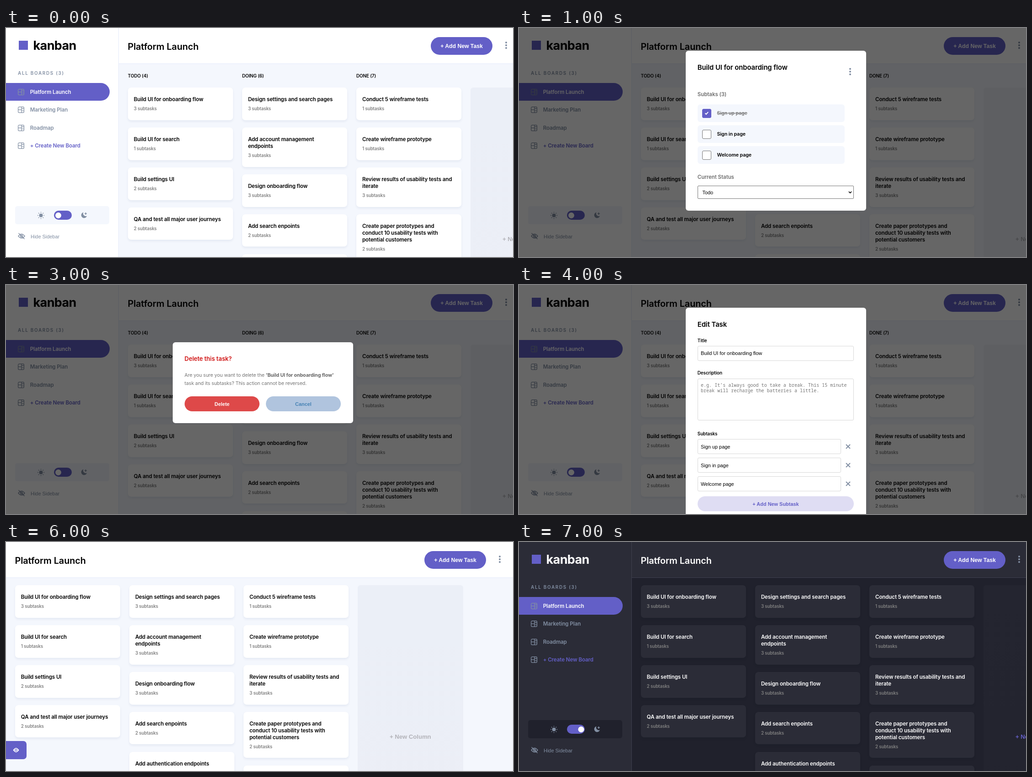
These frames come from a looping animation (1110 px wide and 504 px high, 8000 ms). An HTML page:

```html
<!DOCTYPE html>
<html lang="en">
<head>
<meta charset="utf-8">
<title>Kanban board</title>
<style>
html, body { margin: 0; width: 100%; height: 100%; overflow: hidden; }
.stage {
  --scroll: 0px; --side: 247px; --act: 0px; --knob: 0px; --menu: visible; --tab: hidden;
  --panel: #fff; --page: #f4f7fd; --ink: #000; --line: #e4ebfa;
  --colTop: #ebeff7; --colEnd: #eceef6; --new: #b2b2b8; --shadow: rgba(54, 78, 126, .08);
  position: relative; width: 1110px; height: 504px; overflow: hidden;
  background: var(--page); color: var(--ink); font: 600 11.5px Inter, sans-serif;
  animation: states 8s step-end infinite;
}
@keyframes states {
  62.5% { --scroll: -36px; }
  75% { --side: 0px; --act: -14px; --menu: hidden; --tab: visible; }
  87.5% {
    --side: 247px; --act: 0px; --menu: visible; --tab: hidden; --knob: 21.5px;
    --panel: #2b2c37; --page: #20212c; --ink: #fff; --line: #3e3f4e;
    --colTop: #242530; --colEnd: #22232e; --new: #635fc7; --shadow: rgba(20, 22, 35, .12);
  }
  100% { --scroll: -36px; }
}
.stage div, .stage svg { position: absolute; box-sizing: border-box; }
.text { line-height: 20px; margin-top: -10px; white-space: pre; letter-spacing: -.06px; }

.columns { left: var(--side); top: 0; transform: translateY(var(--scroll)); }
.stage .card {
  position: relative; width: 230px; margin-bottom: 16.4px; padding: 19.2px 13px 17.8px;
  border-radius: 7px; background: var(--panel); box-shadow: 0 3px 5px var(--shadow);
  line-height: 15px; letter-spacing: -.08px; white-space: pre;
}
.card small { display: block; margin-top: 4.6px; font-size: 9.8px; letter-spacing: -.15px; color: #808080; }
.label { font-size: 9.84px; }
.new-column { border-radius: 6px; background: linear-gradient(var(--colTop), var(--colEnd)); }
.new-text { font: 700 13.1px/20px "Liberation Sans", Arial, sans-serif; letter-spacing: 0; color: var(--new); }

.header { left: var(--side); top: 0; right: 0; height: 79px; background: var(--panel); border-bottom: 1px solid var(--line); }
.title { font-size: 19.8px; }
.actions { left: var(--act); top: 0; }
.button {
  display: flex; align-items: center; justify-content: center; border-radius: 20px;
  background: #635fc7; color: #fff; font: 700 10.93px "Liberation Sans", Arial, sans-serif;
}
.large { font-size: 12.2px; }

.sidebar { left: 0; top: 0; width: 247px; height: 504px; background: var(--panel); border-right: 1px solid var(--line); visibility: var(--menu); }
.logo { background: #635fc7; }
.brand { font-size: 27px; font-weight: 700; letter-spacing: -.6px; }
.caps { font-size: 9.84px; letter-spacing: 1.75px; color: #828fa3; }
.active { background: #635fc7; border-radius: 0 20px 20px 0; }
.white { color: #fff; }
.muted { color: #828fa3; }
.accent { color: #635fc7; }
.theme { background: var(--page); border-radius: 5px; }
.switch { background: #635fc7; border-radius: 10px; }
.knob { background: #fff; border-radius: 50%; transform: translateX(var(--knob)); }
.tab { background: #635fc7; border-radius: 0 7px 7px 0; visibility: var(--tab); }
.arial { font: 400 10.93px/20px "Liberation Sans", Arial, sans-serif; letter-spacing: 0; }

.scene { inset: 0; background: rgba(0, 0, 0, .6); color: #000; visibility: hidden; animation: show 8s step-end infinite; }
@keyframes show { 0% { visibility: visible; } 12.5% { visibility: hidden; } }
.modal { background: #fff; border-radius: 6px; }
.head { font-size: 14.8px; }
.grey { color: #6e6e6e; }
.row { background: #f4f7fd; border-radius: 6px; }
.small { font-size: 10.66px; letter-spacing: -.08px; }
.done { color: #757575; text-decoration: line-through; }
.check { border: 1px solid #767676; border-radius: 3px; background: #fff; }
.checked { background: #635fc7; border-color: #635fc7; }
.field { border: 1px solid #d8d8d8; border-radius: 3px; background: #fff; }
.native { border-color: #767676; border-radius: 2px; }
.mono { font: 400 10.05px/12px "Noto Sans Mono", monospace; letter-spacing: 0; margin-top: -6px; }
.hint { color: #757575; }
.red { color: #d01414; }
.question { font-size: 13.1px; }
.body { font-size: 10.66px; font-weight: 400; letter-spacing: -.1px; color: #757575; }
.body b { font-weight: 700; color: #666; }
.light { font-weight: 400; font-size: 10px; color: #999; }
.danger { background: #de4949; }
.cancel { background: #b0c4de; color: #4682b4; }
.soft { background: #dfddf3; color: #635fc7; }
.popup { background: #fff; border-radius: 6px; box-shadow: 0 4px 14px rgba(54, 78, 126, .25); }
</style>
</head>
<body>
<script>
const box = (cls, x, y, w, h, inner = '') =>
  `<div class="${cls}" style="left:${x}px;top:${y}px;width:${w}px;height:${h}px">${inner}</div>`;
// y is the middle of the capitals
const text = (cls, x, y, s) => `<div class="text ${cls}" style="left:${x}px;top:${y}px">${s}</div>`;
const icon = (x, y, w, h, inner) =>
  `<svg style="left:${x}px;top:${y}px" width="${w}" height="${h}" fill="none" stroke="#828fa3">${inner}</svg>`;
const dots = (x, y) => icon(x - 3, y - 9, 6, 18,
  [3, 9, 15].map(cy => `<circle cx="3" cy="${cy}" r="2" fill="#828fa3" stroke="none"/>`).join(''));
const chevron = (x, y) => icon(x - 4, y - 3, 8, 6, '<path d="M1 1l3 3 3-3" stroke="#000" stroke-width="1.7"/>');
const cross = (x, y) => icon(x, y, 11, 11, '<path d="M1 1l9 9M10 1l-9 9" stroke-width="2"/>');
const boardIcon = y => icon(26, y - 7, 14, 14,
  '<path d="M3 .6h8a2.4 2.4 0 0 1 2.4 2.4v8a2.4 2.4 0 0 1-2.4 2.4H3A2.4 2.4 0 0 1 .6 11V3A2.4 2.4 0 0 1 3 .6zM8 .6v12.8M.6 6.8H8M8 4.4h5.4M8 9h5.4" stroke-width="1.2"/>');

const lists = [
  ['TODO (4)', ['Build UI for onboarding flow', 3], ['Build UI for search', 1], ['Build settings UI', 2],
    ['QA and test all major user journeys', 2]],
  ['DOING (6)', ['Design settings and search pages', 3], ['Add account management\nendpoints', 3],
    ['Design onboarding flow', 3], ['Add search enpoints', 2], ['Add authentication endpoints', 3]],
  ['DONE (7)', ['Conduct 5 wireframe tests', 1], ['Create wireframe prototype', 1],
    ['Review results of usability tests and\niterate', 3],
    ['Create paper prototypes and\nconduct 10 usability tests with\npotential customers', 2], ['', 1]],
];

const columns = lists.map(([name, ...cards], i) => {
  const x = 19.8 + 250.1 * i;
  return text('label', x, 105, name) + box('', x, 131, 230, 0, cards.map(([title, n]) =>
    `<div class="card">${title}<small>${n} subtasks</small></div>`).join(''));
}).join('');

const board = `<div class="columns">${columns}${box('new-column', 770.2, 131, 230.5, 668)}
  ${text('new-text', 840, 465, '+ New Column')}</div>
  <div class="header">${text('title', 19.5, 40.5, 'Platform Launch')}</div>
  <div class="actions">${box('button large', 930, 20, 135, 39, '+ Add New Task')}${dots(1094.5, 38)}</div>`;

const sun = icon(68, 404, 17, 17, `<circle cx="8.5" cy="8.5" r="4" fill="#828fa3" stroke="none"/>
  <circle cx="8.5" cy="8.5" r="6.8" stroke-width="1.7" pathLength="80" stroke-dasharray="3 7" stroke-dashoffset="1.5"/>`);
const moon = icon(164, 405, 14, 14, `<path d="M5.5 .8A6.3 6.3 0 1 0 13 8.8A5.9 5.9 0 0 1 5.5 .8z" fill="#828fa3" stroke="none"/>
  <path d="M10.4 1v5M8 3.5h5" stroke-width="1.5"/>`);
const hiddenEye = icon(26, 450, 16, 16, `<path d="M1 8Q8 -1 15 8Q8 17 1 8zM1.5 1.5l13 13" stroke-width="1.4"/>
  <circle cx="8" cy="8" r="2.4" stroke-width="1.4"/>`);
const eye = icon(15, 15, 14, 10, `<path d="M.5 5Q7 -4.4 13.5 5Q7 14.4 .5 5z" fill="#fff" stroke="none"/>
  <circle cx="7" cy="5" r="2.9" fill="#635fc7" stroke="none"/><circle cx="7" cy="5" r="1.7" fill="#fff" stroke="none"/>`);

const nav = [['Platform Launch', 'white'], ['Marketing Plan', 'muted'], ['Roadmap', 'muted'],
  ['+ Create New Board', 'accent']].map(([name, cls], i) => {
  const y = 141 + 39.4 * i;
  return boardIcon(y) + text(cls, 52.7, y, name);
}).join('');

const sidebar = `<div class="sidebar">${box('logo', 28, 28, 20, 20)}
  ${text('brand', 59.5, 38.5, 'kanban')}${text('caps', 26, 99, 'ALL BOARDS (3)')}
  ${box('active', 0, 121, 227, 39)}${nav}${box('theme', 20, 392, 206, 40)}${sun}
  ${box('switch', 104.5, 402, 39.5, 20)}${box('knob', 107.5, 405.5, 13, 13)}${moon}
  ${hiddenEye}${text('arial muted', 54, 458.5, 'Hide Sidebar')}</div>${box('tab', 0, 438, 45, 40, eye)}`;

const modal = (y, h, inner) => box('modal', 364.5, y, 395, h, inner);
const scene = (second, inner) => `<div class="scene" style="animation-delay:${second}s">${inner}</div>`;
const subtasks = ['Sign up page', 'Sign in page', 'Welcome page'];
const taskName = lists[0][1][0];

const task = modal(50, 352, text('head', 26.3, 37, taskName) + dots(360, 46) +
  text('grey', 26.3, 95.5, 'Subtaks (3)') +
  subtasks.map((name, i) => {
    const y = 118 + 46 * i;
    return box('row', 26.5, y, 322, 39) + box(i ? 'check' : 'check checked', 36.5, y + 9.5, 20, 20) +
      text(i ? 'small' : 'small done', 69, y + 20, name);
  }).join('') +
  icon(41.5, 133, 10, 9, '<path d="M1.5 4.5l2.3 2.3 4.4-5" stroke="#fff" stroke-width="1.9"/>') +
  text('grey', 26.3, 277.5, 'Current Status') + box('field native', 26.5, 297, 342, 29) +
  text('arial', 37, 311.5, 'Todo') + chevron(360, 311.5));

const popup = box('popup', 576, 115, 157, 77,
  text('small muted', 13, 24, 'Edit Task') + text('small red', 13, 53, 'Delete Task'));

const confirm = modal(126, 178, text('red question', 26.3, 35.5, 'Delete this task?') +
  text('body', 26.3, 72.5, `Are you sure you want to delete the <b>'${taskName}'</b>`) +
  text('body', 26.3, 90.5, 'task and its subtasks? This action cannot be reversed.') +
  box('button danger', 26.5, 119, 164, 33, 'Delete') + box('button cancel', 204.5, 119, 164, 33, 'Cancel'));

const formTop = (heading, name, nameClass) => text('head', 26.3, 36.5, heading) +
  text('label', 26.3, 71.5, 'Title') + box('field', 26.5, 84, 342, 33) + text(`arial ${nameClass}`, 33.5, 100, name) +
  text('label', 26.3, 143, 'Description') + box('field', 26.5, 155.5, 342, 92) +
  text('mono hint', 33.5, 170, 'e.g. It’s always good to take a break. This 15 minute\nbreak will recharge the batteries a little.') +
  text('label', 26.3, 277, 'Subtasks');

const edit = modal(50, 560, formTop('Edit Task', taskName, '') +
  subtasks.map((name, i) => {
    const y = 289 + 41 * i;
    return box('field', 26.5, y, 314, 33) + text('arial', 33.5, y + 16.5, name) + cross(350, y + 11);
  }).join('') +
  box('button soft', 26.5, 415, 342, 33, '+ Add New Subtask'));

const add = modal(14, 510, formTop('Add New Task', 'e.g. Take coffee break', 'hint') +
  text('light', 26.3, 296, 'You have not added a subtask yet') +
  box('button soft', 26.5, 315, 342, 33, '+ Add New Subtask') +
  text('label', 26.3, 374, 'Status') + box('field', 26.5, 386.5, 342, 33) +
  text('arial', 37, 403, 'Todo') + chevron(360, 403) +
  box('button', 26.5, 439, 342, 33, 'Create Task'));

document.body.innerHTML = `<div class="stage">${board}${sidebar}
  ${scene(1, task)}${scene(2, task + popup)}${scene(3, confirm)}${scene(4, edit)}${scene(5, add)}</div>`;
</script>
</body>
</html>
```
